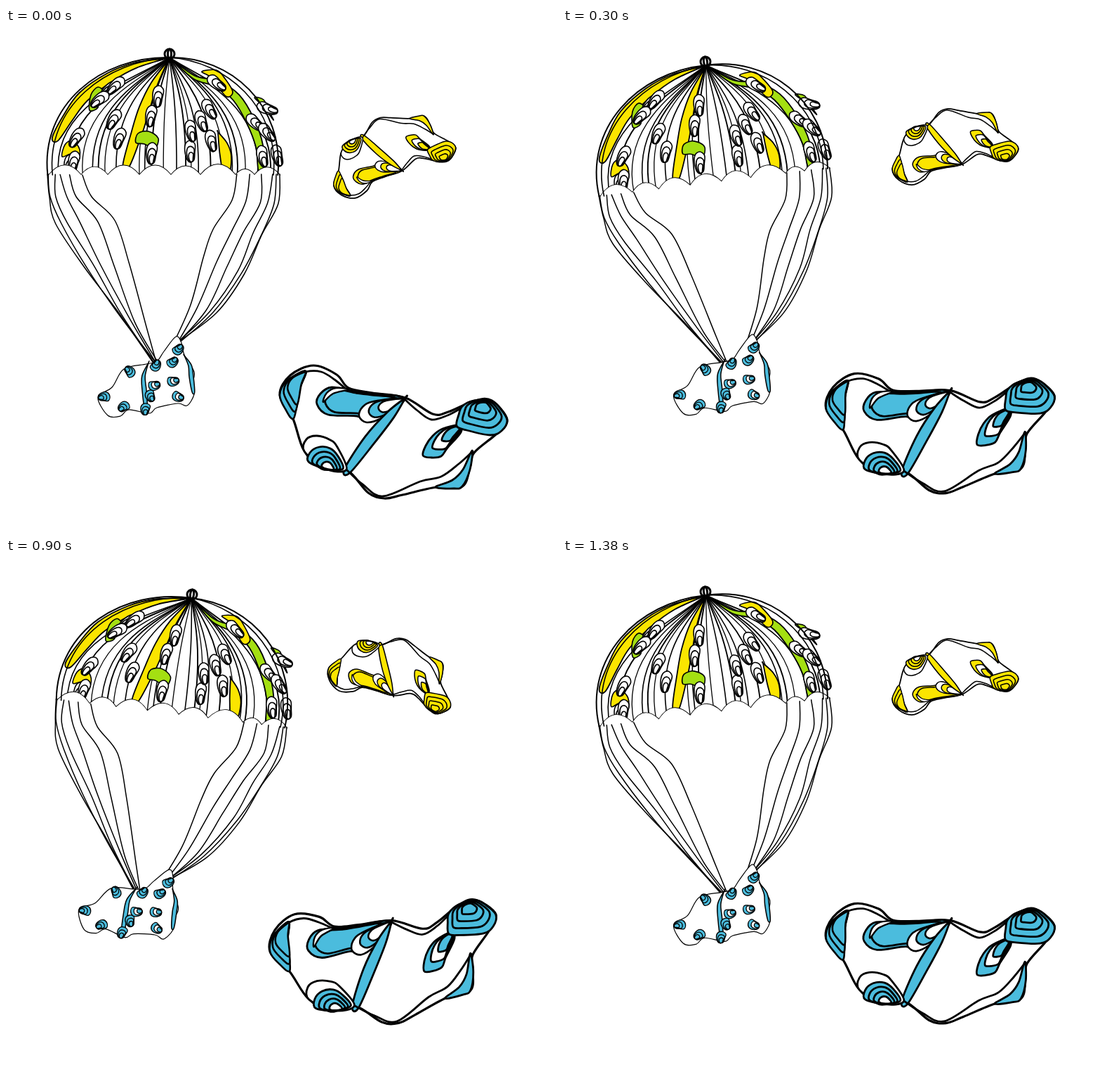
Animation of 785 by 714 pixels, one loop 1500 ms. Source, as an HTML page with a canvas:

```html
<!DOCTYPE html>
<html>
<head>
<meta charset="utf-8">
<style>
html, body { margin: 0; width: 100%; height: 100%; overflow: hidden; background: #fff }
canvas { display: block }
</style>
</head>
<body>
<canvas id="stage" width="785" height="714"></canvas>
<script>
const ctx = document.getElementById('stage').getContext('2d');
const BLUE = '#4bbcdd', YELLOW = '#fbe500', GREEN = '#a4df12', WHITE = '#fff';
const { PI, sin, atan2, hypot } = Math;

const parse = s => s.split(' ').map(p => p.split(',').map(Number));
const mix = (a, b, t) => a + (b - a) * t;

// Smooth curve through points
function trace(pts, closed) {
  const n = pts.length;
  const at = i => closed ? pts[(i + n) % n] : pts[Math.max(0, Math.min(n - 1, i))];
  ctx.beginPath();
  ctx.moveTo(...pts[0]);
  for (let i = 0; i < (closed ? n : n - 1); i++) {
    const [a, b, c, d] = [at(i - 1), at(i), at(i + 1), at(i + 2)];
    ctx.bezierCurveTo(b[0] + (c[0] - a[0]) / 6, b[1] + (c[1] - a[1]) / 6,
      c[0] - (d[0] - b[0]) / 6, c[1] - (d[1] - b[1]) / 6, c[0], c[1]);
  }
}
function line(pts, width) {
  ctx.lineWidth = width;
  trace(pts, false);
  ctx.stroke();
}
function shape(pts, fill, width) {
  ctx.lineWidth = width;
  trace(pts, true);
  ctx.fillStyle = fill;
  ctx.fill();
  ctx.stroke();
}
const blob = (s, fill, width) => shape(parse(s), fill, width);

// A blob with smaller copies shrunk toward an anchor
function rings(pts, fills, [ax, ay], width, step = .28) {
  fills.forEach((fill, i) => {
    const k = 1 - i * step;
    shape(pts.map(([x, y]) => [mix(ax, x, k), mix(ay, y, k)]), fill, width);
  });
}

// A strip around a centre line, pointed at its start
function ribbon(s, half, fill, width) {
  const pts = parse(s), n = pts.length - 1;
  const side = dir => pts.map(([x, y], i) => {
    const a = pts[Math.max(0, i - 1)], b = pts[Math.min(n, i + 1)];
    const dx = b[0] - a[0], dy = b[1] - a[1];
    const r = dir * half * sin(PI * .8 * i / n) / hypot(dx, dy);
    return [x - dy * r, y + dx * r];
  });
  shape([...side(1), ...side(-1).reverse()], fill, width);
}

// Nested loops that share a base, like a knot in wood
const EGG = parse('-.5,1 -1,.2 -.8,-.7 .1,-1 .9,-.6 .7,.2 .4,.9');
function knot(x, y, w, h, turn, fills, width) {
  ctx.save();
  ctx.translate(x, y);
  ctx.rotate(turn);
  rings(EGG.map(([u, v]) => [u * w, v * h]), fills, [0, h], width);
  ctx.restore();
}

function cloud(color) {
  blob('390,522 405,494 438,480 471,493 488,512 522,519 569,526 608,549 630,546 668,530 692,530 714,557 699,577 667,604 661,625 650,652 613,653 565,664 539,669 516,661 486,629 450,627 424,600 409,556', WHITE, 3.2);

  rings(parse('390,522 400,502 427,488 418,515 410,555 398,542'), [color, color, color], [427, 488], 2.6, .15);
  line(parse('404,499 427,489 449,489 468,500 486,515'), 2.8);

  rings(parse('443,535 448,520 464,511 497,517 522,520 567,527 536,553 517,560 500,552 459,550'), [color, color], [510, 530], 2.8, .18);
  blob('452,532 457,519 470,512 488,514 466,520', WHITE, 2.4);
  rings(parse('503,552 508,539 524,531 567,527 553,542 535,555 514,561'), [WHITE, color, WHITE], [566, 528], 2.6, .22);

  ribbon('569,526 548,550 518,586 486,630', 8, color, 2.8);
  line(parse('569,529 586,544 606,557 629,551 648,541'), 2.8);
  blob('612,653 636,643 651,628 664,601 661,628 650,652 638,655', color, 2.8);
  line(parse('486,629 508,649 537,666 590,645 620,638 645,620 665,602'), 2.8);

  blob('425,602 428,585 443,580 462,586 472,596 485,628 455,627', WHITE, 2.8);
  rings(parse('431,617 433,604 446,596 462,598 473,609 480,627 456,627'), [color, color, color, WHITE], [460, 628], 2.8, .22);

  rings(parse('594,608 598,594 608,580 622,570 645,565 648,575 629,597 620,609 606,611'), [color, WHITE, color], [644, 568], 2.8, .27);
  rings(parse('645,550 650,538 666,530 691,530 704,541 714,558 706,573 690,579 656,572 642,566'), [color, color, color, color], [680, 534], 2.8, .23);
}

// Each side is a fan between its outer and its inner string
const STRINGS = [
  ['59,208 60,240 72,278 112,340 155,400 210,475', '107,209 122,240 157,274 174,335 200,427 215,472'],
  ['390,208 386,250 366,294 340,350 298,405 244,448', '327,208 322,245 297,286 280,325 262,395 236,458']
].map(side => side.map(parse));

function strings() {
  for (const [outer, inner] of STRINGS)
    for (let i = 0; i < 6; i++) {
      const t = (i / 5) ** 1.8;
      line(outer.map(([x, y], j) => [mix(x, inner[j][0], t) + sin(i * 4 + j * 2) * 2, mix(y, inner[j][1], t)]), 1.5);
    }
}

// Arched line from the crown down to the hem
function rib(w, high, low, bend, width) {
  ctx.lineWidth = width;
  ctx.beginPath();
  ctx.moveTo(233, 42);
  ctx.bezierCurveTo(233 + w * bend, high, 233 + w * 1.03, low, 233 + w * .97, 209);
  ctx.stroke();
}

const KNOTS = parse('148,88 157,82 154,130 162,157 207,125 217,97 263,175 264,146 290,115 279,132 293,160 300,78 355,134 372,148 366,182 387,181 372,114 134,102 101,156 91,195 97,190 208,178');
const HEM = [61, 107, 145, 190, 235, 277, 327, 354, 390];

function canopy() {
  for (let i = 1; i < 24; i++)
    rib(mix(-172, 157, i / 24) + sin(i * 5) * 5, 72, 108, .3, 1.3 + i % 3 * .3);

  ribbon('230,43 185,53 148,70 110,98 88,128 70,158', 8, YELLOW, 1.8);
  ribbon('231,46 211,80 197,115 186,150 171,196', 8, YELLOW, 1.8);
  ribbon('238,46 268,70 302,80 328,99 348,132 361,168 363,202', 6, GREEN, 1.8);
  ribbon('302,148 309,165 313,182 314,204', 8, YELLOW, 1.8);
  blob('279,62 300,60 312,72 323,91 313,97 293,71', YELLOW, 1.6);
  blob('119,117 121,95 131,84 139,91 130,98 131,113', GREEN, 1.6);
  blob('354,99 367,102 374,117 381,131 366,111', GREEN, 1.6);
  blob('80,183 84,166 95,160 105,173 103,190 94,179', YELLOW, 1.6);
  blob('185,163 188,150 203,147 217,157 213,174 207,193 202,186 206,172 197,165', GREEN, 1.6);

  // Knots lean toward the crown, most of all near the top
  for (const [x, y] of KNOTS)
    knot(x, y, 8, 15, (220 - x) * (200 - y) * 1e-4, [WHITE, WHITE, WHITE], 1.6);

  // Scalloped hem; white below it trims whatever hangs over
  const scallops = () => HEM.slice(1).forEach((x, i) =>
    ctx.quadraticCurveTo((x + HEM[i]) / 2, 209 - (x - HEM[i]) * .6, x, 209));
  ctx.fillStyle = WHITE;
  ctx.lineWidth = 1.8;
  ctx.beginPath();
  ctx.moveTo(HEM[0], 209);
  scallops();
  ctx.stroke();
  ctx.lineTo(390, 225);
  ctx.lineTo(61, 225);
  ctx.fill();

  for (const w of [-179, 159]) {
    rib(w, 40, 110, .55, 2);
    rib(w * .96, 47, 112, .52, 1.6);
  }
  for (const rx of [7, 2.5]) {
    ctx.lineWidth = 3;
    ctx.beginPath();
    ctx.ellipse(233, 37, rx, 7, 0, 0, 7);
    ctx.stroke();
  }
}

const SPOTS = parse('140,525 176,489 213,480 245,457 237,475 168,539 199,542 206,523 211,508 238,502 245,524');

function basket() {
  blob('242,439 250,448 254,465 268,489 266,505 268,521 258,537 245,534 215,540 204,548 175,543 163,552 145,551 131,525 151,511 168,485 200,478 215,474 225,460', WHITE, 1.2);
  ribbon('203,476 196,495 197,515 200,546', 3, BLUE, 1.5);
  ribbon('254,466 262,480 264,496 267,518', 3, BLUE, 1.5);
  // Spots open toward the middle
  SPOTS.forEach(([x, y], i) =>
    knot(x, y, 7, 8, atan2(y - 512, x - 200) - PI / 2, [BLUE, i > 7 ? WHITE : BLUE, BLUE], 1.3));
}

// Each pose: where the pivot lands, and the turn in degrees
const parts = [
  { draw() { canopy(); strings(); }, pivot: [233, 37], scale: [1, 1],
    poses: [[233, 37, 0], [203, 48, -7], [228, 36, -1], [265, 52, 7]] },
  { draw: basket, pivot: [198, 508.6], scale: [1, 1],
    poses: [[198, 508.6, 0], [224.6, 505.9, 0], [221.4, 472.4, 27], [172.9, 500, 14]] },
  { draw: () => cloud(YELLOW), pivot: [535, 557], scale: [.558, -.558],
    poses: [[542.7, 189.5, -10.8], [549, 177.5, -2.8], [536.7, 186, 8.2], [541.5, 172, 24.2]] },
  { draw: () => cloud(BLUE), pivot: [538.6, 592.3], scale: [1, 1],
    poses: [[538.6, 592.3, 0], [532.7, 586, -9.4], [550.4, 596.6, -17.2], [538.3, 587.7, -15.7]] }
];
const order = [0, 1, 2, 3, 1];

function render() {
  const step = order[Math.floor(performance.now() % 1500 / 300)];
  ctx.fillStyle = WHITE;
  ctx.fillRect(0, 0, 785, 714);
  ctx.lineJoin = ctx.lineCap = 'round';
  for (const { draw, pivot, scale, poses } of parts) {
    const [x, y, turn] = poses[step];
    ctx.save();
    ctx.translate(x, y);
    ctx.rotate(turn * PI / 180);
    ctx.scale(...scale);
    ctx.translate(-pivot[0], -pivot[1]);
    draw();
    ctx.restore();
  }
  requestAnimationFrame(render);
}
render();
</script>
</body>
</html>
```
